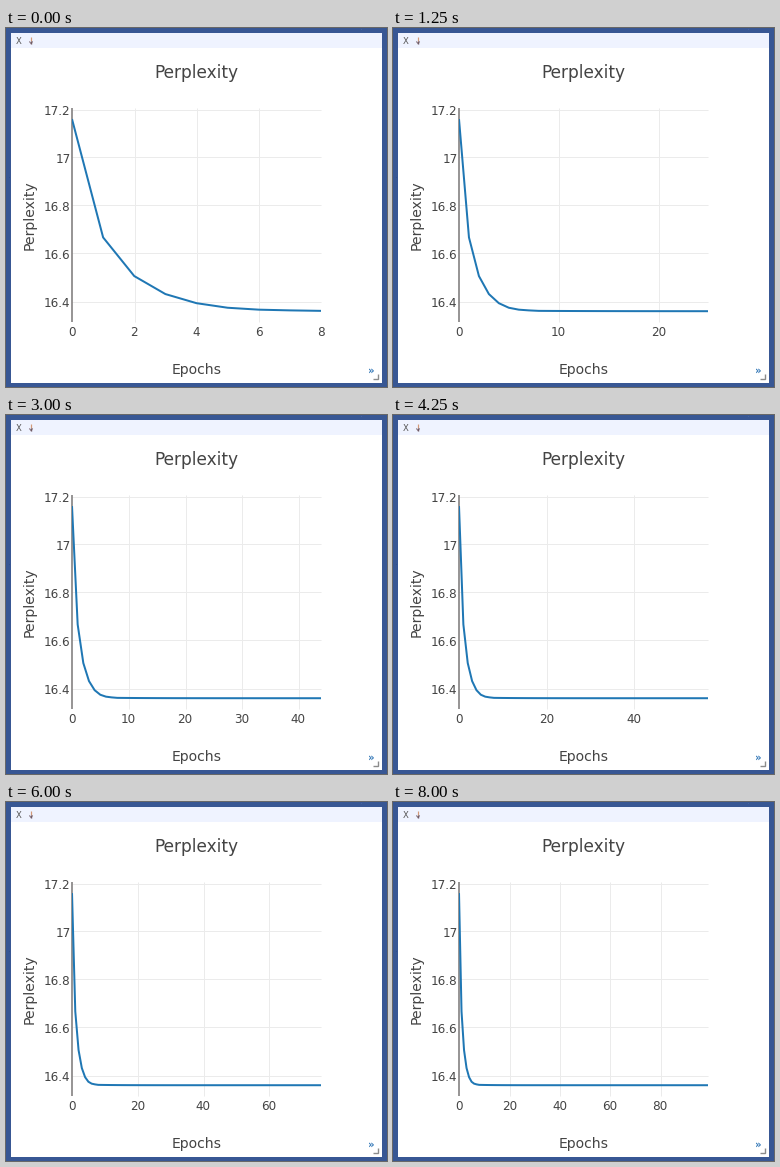
Recreate the animation shown at these times as a matplotlib script. Size 381x359 px, loop 8.75 s.

```python
import random

import matplotlib.pyplot as plt
import numpy as np
from matplotlib.animation import FuncAnimation
from matplotlib.patches import Rectangle

W, H, DPI = 381, 359, 64
PT = 72 / DPI  # points per pixel
LEFT, RIGHT, TOP, BOTTOM = 66, 315, 80, 294
FRAMES, INTERVAL = 35, 250
HOLDS = (6, 13, 23, 33, 34)  # ticks where no new epochs arrive
TEXT, GRID, LINE = "#444444", "#ebebeb", "#1f77b4"

plt.rcParams["font.family"] = "DejaVu Sans"
fig = plt.figure(figsize=(W / DPI, H / DPI), dpi=DPI)
ax = fig.add_axes([0, 0, 1, 1])
ax.set_xlim(0, W)
ax.set_ylim(H, 0)
ax.axis("off")


def box(x, y, w, h, color):
    patch = Rectangle((x, y), w, h, fc=color, ec="none")
    ax.add_patch(patch)
    return patch


def stroke(xs, ys, color, width=1, **kw):
    kw.setdefault("solid_capstyle", "butt")
    return ax.plot(xs, ys, color=color, lw=width * PT, **kw)[0]


def label(x, y, s, size, ha="center", color=TEXT, **kw):
    kw.setdefault("va", "baseline")
    return ax.text(x, y, s, fontsize=size * PT, ha=ha, color=color, **kw)


def y_pixel(value):
    return 81.5 + (17.2 - value) * 240


def perplexity(epochs):
    start = [17.16, 16.667, 16.506, 16.431, 16.393, 16.374, 16.366, 16.363, 16.361]
    tail = 16.3595 + 0.0015 * np.exp(-(epochs - 8) / 6)
    return np.where(epochs <= 8, np.interp(epochs, range(9), start), tail)


def last_epoch(frame):
    step = frame - sum(frame >= h for h in HOLDS)
    return round(np.interp(step, [0, 5, 11, 15, 21, 24, 29],
                           [8, 25, 44, 57, 76, 85, 99]))


def tick_step(n):
    return next(d for d in (2, 5, 10, 20, 50) if d > n / 5)


# Page background and window
box(0, 0, W, H, "#385794")
rng = random.Random(4)
for _ in range(160):
    box(rng.randrange(W), rng.randrange(H), 1, 1, rng.choice(["#4362a0", "#304f8c"]))
box(5, 5, 371, 350, "white")
box(5, 5, 371, 15, "#eff3ff")
label(12.2, 16, "X", 8.5, color="#555555")
stroke([25, 25], [9, 13], "#d39a78", 1.2)
stroke([25, 25], [12.5, 16], "#6b5560", 1.4)
stroke([23.3, 25, 26.7], [13.5, 15.5, 13.5], "#76606a", 0.9)
label(364.8, 345.5, "»", 10, color="#3579b8", weight="bold")
stroke([366.5, 372, 372], [351, 351, 346], "#8c8c8c", 1.4, solid_joinstyle="miter")

# Fixed chart parts
label(190.5, 50, "Perplexity", 17)
label(190.5, 346, "Epochs", 14)
label(28, 187, "Perplexity", 14, ha="right", va="center", rotation=90,
      rotation_mode="default").set_visible(False)
label(28, 187, "Perplexity", 14, rotation=90, rotation_mode="anchor")
for value in (17.2, 17, 16.8, 16.6, 16.4):
    y = y_pixel(value)
    stroke([LEFT, RIGHT], [y, y], GRID)
    label(64.5, y + 5.5, f"{value:g}", 12, ha="right")

grid = [stroke([], [], GRID) for _ in range(5)]
ticks = [label(0, 308, "", 12) for _ in range(5)]
stroke([66, 66], [TOP, BOTTOM], "#777474", 1.5, snap=False)
curve = stroke([], [], LINE, 2, solid_joinstyle="miter")
curve.set_clip_path(Rectangle((LEFT, TOP), RIGHT - LEFT, BOTTOM - TOP,
                              transform=ax.transData))


def draw(frame):
    n = last_epoch(frame)
    scale = (RIGHT - LEFT) / n
    epochs = np.arange(n + 1)
    curve.set_data(LEFT + epochs * scale, y_pixel(perplexity(epochs)))
    step = tick_step(n)
    for i, (rule, tick) in enumerate(zip(grid, ticks)):
        value = i * step
        x = LEFT + value * scale
        rule.set_data([int(x) + 0.5] * 2, [TOP, BOTTOM])
        rule.set_visible(0 < value < n)
        tick.set_text(str(value))
        tick.set_x(x)
        tick.set_visible(value <= n)
    return [curve, *grid, *ticks]


anim = FuncAnimation(fig, draw, frames=FRAMES, interval=INTERVAL,
                     init_func=lambda: draw(0), repeat=True, repeat_delay=0)
plt.show()
```
